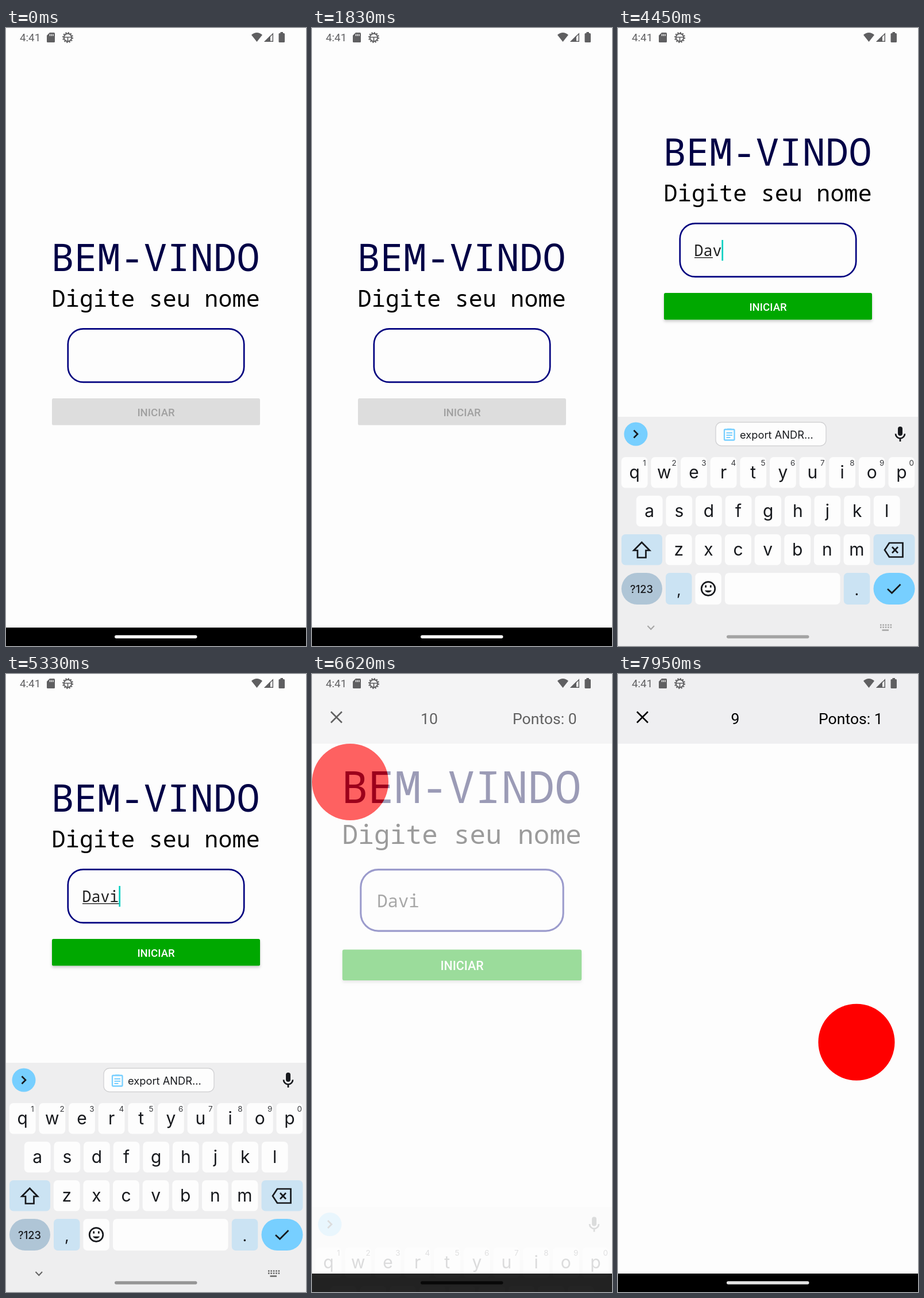
An HTML page that plays this animation: 522x1073 px, repeating every 8 s.

```html
<!DOCTYPE html>
<html lang="pt">
<head>
<meta charset="utf-8">
<style>
html, body { margin: 0; width: 100%; height: 100%; overflow: hidden; background: #fdfdfd; }
svg { display: block; width: 522px; height: 1073px; }
text { font-family: Roboto, sans-serif; white-space: pre; }
.mono { font-family: "Noto Sans Mono", monospace; }
.kb text { font-family: Inter, sans-serif; fill: #17191d; }
.line { fill: none; stroke: #17191d; stroke-width: 2.7; }
.caps .letter { text-transform: uppercase; }
.caps #shift { fill: #17191d; }
.mid { text-anchor: middle; }
</style>
</head>
<body>
<svg id="stage" viewBox="0 0 522 1073"></svg>
<script>
const LOOP = 8000, NAME = 'Davi';
const TYPED = [4180, 4300, 4420, 4860];   // when each letter arrives
const OPEN = 3597, START = 6450, HIDE = 6502, TAP = 7720, TICK = 7600;

const rect = (x, y, w, h, r, fill, more = '') =>
  `<rect x="${x}" y="${y}" width="${w}" height="${h}" rx="${r}" fill="${fill}" ${more}/>`;
const text = (x, y, size, str, more = '') =>
  `<text x="${x}" y="${y}" font-size="${size}" ${more}>${str}</text>`;
const path = (d, more = 'class="line"') => `<path d="${d}" ${more}/>`;

function statusBar() {
  return `<g fill="#5f5f61">` +
    text(24, 23, 18.8, '4:41') +
    path('M76 8H83.500Q85 8 85 9.500V23.500Q85 25 83.500 25H72.500Q71 25 71 23.500V13Z', '') +
    path('M76.500 10.500v3.500M79.300 10.500v3.500M82 10.500v3.500', 'stroke="#fdfdfd" stroke-width="1.300"') +
    `<g fill="none" stroke="#5f5f61">
      <circle cx="107.500" cy="16.500" r="6.700" stroke-width="2"/>
      <circle cx="107.500" cy="16.500" r="8.500" stroke-width="2" stroke-dasharray="2.225"/>
      <path d="M101 16H114M107.500 16V23" stroke-width="1.700"/>
    </g>` +
    path('M427 12Q436.500 4 446 12L436.500 24Z', '') +
    path('M449 24L460 13V24Z', '') +
    path('M451 23.300L464.300 10V23.300Z', 'fill="none" stroke="#5f5f61" stroke-width="1.500"') +
    rect(474.500, 9, 10.500, 16, 1.500, '#5f5f61') + rect(477.500, 7, 4.500, 4, 0, '#5f5f61') + `</g>`;
}

function welcome() {
  return `<g id="form">` +
    text(78.300, 421.800, 66.500, 'BEM-VINDO', 'class="mono" fill="#000046" letter-spacing=".5"') +
    text(79.600, 483.800, 39.900, 'Digite seu nome', 'class="mono" letter-spacing=".220"') +
    rect(107.800, 522.300, 306.400, 92.600, 26.600, 'none', 'stroke="#00007f" stroke-width="2.700"') +
    text(132.500, 579, 26.600, '', 'id="name" class="mono" fill="#202020"') +
    rect(133, 581, 0, 1.400, 0, '#202020', 'id="underline"') +
    rect(180, 551, 2.700, 36, 0, '#04d0c2', 'id="caret"') +
    rect(80, 643, 362, 46.600, 2.700, '#ddd', 'id="button"') +
    text(261, 673.500, 18.600, 'INICIAR', 'id="label" class="mid" font-weight="500"') + `</g>`;
}

function keyRow(letters, left, top, hints) {
  return [...letters].map((c, i) => {
    const x = left + i * 51.630;
    return rect(x, top, 45.800, 53.500, 7, '#fdfdfd') +
      text(x + 22.900, top + 37, 30, c, 'class="letter mid"') +
      (hints ? text(x + 40.300, top + 15, 13.500, (i + 1) % 10, 'class="mid" opacity=".85"') : '');
  }).join('');
}

function keyboard() {
  const blue = '#cbe3f3', sky = '#77cfff';
  let dots = '';
  for (let i = 0; i < 10; i++) dots += `M${456 + i % 5 * 4.400} ${1036.500 + (i / 5 | 0) * 4}h2.500`;
  return `<g id="kb" class="kb">` + rect(0, 675, 522, 398, 0, '#eeeeef') +
    `<circle cx="31" cy="705" r="20.500" fill="${sky}"/>` + path('M27.500 698.500L34 705L27.500 711.500') +
    `<g id="chip">` + rect(170, 684.500, 192, 41, 10, '#fdfdfd', 'stroke="#d2d2d4" stroke-width="1.300"') +
    rect(185, 697, 17.500, 18.500, 1.500, 'none', `stroke="${sky}" stroke-width="2.300"`) +
    path('M188.500 703h10.500M188.500 707h10.500M188.500 711h7M190 696.500h7.500',
      `stroke="${sky}" stroke-width="2"`) +
    text(212, 713, 18.300, 'export ANDR...') + `</g>` +
    rect(487, 692, 8, 16, 4, '#17191d') + path('M483 704.500a8 8 0 0 0 16 0M491 712.500V718') +
    keyRow('qwertyuiop', 5.800, 745, true) +
    keyRow('asdfghjkl', 31.800, 812) +
    keyRow('zxcvbnm', 82.800, 879) +
    rect(6, 879, 71, 53.500, 7, blue) + rect(444.500, 879, 72, 53.500, 7, blue) +
    path('M41.300 893L55 907H48.500V919.500H34V907H27.500Z', 'id="shift" class="line"') +
    path('M472 894H495.500V918.500H472L464 906.200ZM477 901l10 10.500M487 901l-10 10.500') +
    rect(6, 946, 71, 55, 27.500, '#afc5d6') + text(41, 981, 18.300, '?123', 'class="mid" font-weight="500"') +
    rect(83, 946, 45.500, 55, 7, blue) + text(106, 985, 27, ',', 'class="mid"') +
    rect(134.300, 946, 45.500, 55, 7, '#fdfdfd') +
    `<circle cx="157" cy="973.500" r="11.800" class="line"/>` +
    path('M151 976.500a6.500 5.500 0 0 0 12 0Z', 'fill="#17191d"') +
    path('M152.700 967.500v4M161.300 967.500v4') +
    rect(186, 946, 200.500, 55, 7, '#fdfdfd') +
    rect(392.800, 946, 45.500, 55, 7, blue) + text(415.500, 985, 27, '.', 'class="mid"') +
    rect(444.500, 946, 72, 55, 27.500, sky) + path('M469 974L476.500 981L491.500 966') +
    `<g id="navIcons" fill="none">` + path('M51.500 1038L57.300 1044L63 1038', 'stroke-width="2"') +
    path(dots + 'M459.500 1045.500h11.500', 'stroke-width="2.300"') + `</g></g>`;
}

function game() {
  return `<g id="game">` + rect(0, 0, 522, 1073, 0, '#fdfdfd') + rect(0, 0, 522, 121, 0, '#efeff1') +
    path('M33 65.500L52 84.500M52 65.500L33 84.500', 'stroke="#000" stroke-width="2.500"') +
    text(204, 87, 26.600, '10', 'id="clock" class="mid"') +
    text(349, 87, 26.600, '', 'id="score"') +
    `<circle id="ball" r="66.500" fill="#f00"/>` + rect(0, 1041, 522, 32, 0, '#000') + `</g>`;
}

stage.innerHTML = `<defs><filter id="soft" x="-5%" y="-20%" width="110%" height="160%">
  <feDropShadow dx="0" dy="3" stdDeviation="2.500" flood-opacity=".2"/></filter></defs>` +
  rect(0, 0, 522, 1073, 0, '#fdfdfd') + welcome() + rect(0, 1041, 522, 32, 0, '#000') +
  keyboard() + game() + statusBar() + rect(189, 1054.200, 143.500, 5.600, 2.800, '#fff', 'id="pill"');

const el = id => document.getElementById(id);
const set = (id, attrs) => { for (const k in attrs) el(id).setAttribute(k, attrs[k]); };
const put = (id, str) => { if (el(id).textContent !== str) el(id).textContent = str; };
const part = (t, a, b) => Math.min(1, Math.max(0, (t - a) / (b - a)));
const gray = v => `rgb(${v},${v},${v})`;

// Value at t on a line through [time, value] points
function along(t, points) {
  let v = points[0][1];
  for (let i = 1; i < points.length; i++) {
    const [t0] = points[i - 1], [t1, v1] = points[i];
    v += (v1 - v) * part(t, t0, t1);
  }
  return v;
}

function draw(t) {
  const typed = TYPED.filter(at => t >= at).length;
  const marked = TYPED.filter(at => t >= at + 60).length;
  const lastEdit = typed ? TYPED[typed - 1] : OPEN + 150;
  const focused = t < START;
  const zoom = 1 + .15 * (1 - (1 - part(t, START, 6620)) ** 3);

  set('form', { transform: t < OPEN ? '' :
    `translate(261 337) scale(${zoom}) translate(-261 -520)` });
  put('name', NAME.slice(0, typed));
  set('underline', { width: focused ? marked * 15.960 : 0 });
  set('caret', {
    x: 132.500 + typed * 15.960 - (typed ? 0 : 1),
    opacity: +(focused && t >= lastEdit && (t - lastEdit) % 1000 < 500)
  });
  set('button', { fill: typed ? '#00a800' : '#ddd', filter: typed ? 'url(#soft)' : 'none' });
  set('label', { fill: typed ? '#fff' : '#a0a0a0' });

  const shown = 1 - (1 - part(t, OPEN, OPEN + 240)) ** 2 - part(t, HIDE, HIDE + 150) ** 2;
  set('kb', {
    opacity: shown, transform: `translate(0 ${398 * (1 - shown)})`,
    class: t < TYPED[0] + 40 ? 'kb caps' : 'kb'
  });
  const grow = part(t, 3680, 3850);
  set('chip', {
    opacity: t < HIDE ? .4 + .6 * grow : 0,
    transform: `translate(266 705) scale(${.5 + .5 * grow}) translate(-266 -705)`
  });
  set('navIcons', { stroke: gray(along(t, [[3900, 225], [4450, 165], [4900, 100]])) });
  set('pill', { fill: gray(along(t,
    [[3650, 248], [4450, 163], [4900, 150], [6450, 150], [6600, 8], [6640, 8], [6900, 228]])) });

  const hit = t >= TAP;
  set('game', { opacity: part(t, 6560, 6660) });
  set('ball', { cx: hit ? 415 : 66.500, cy: hit ? 639.200 : 187.500 });
  put('clock', t >= TICK ? '9' : '10');
  put('score', 'Pontos: ' + (hit ? 1 : 0));
}

function frame() {
  draw(performance.now() % LOOP);
  requestAnimationFrame(frame);
}
frame();
</script>
</body>
</html>
```
